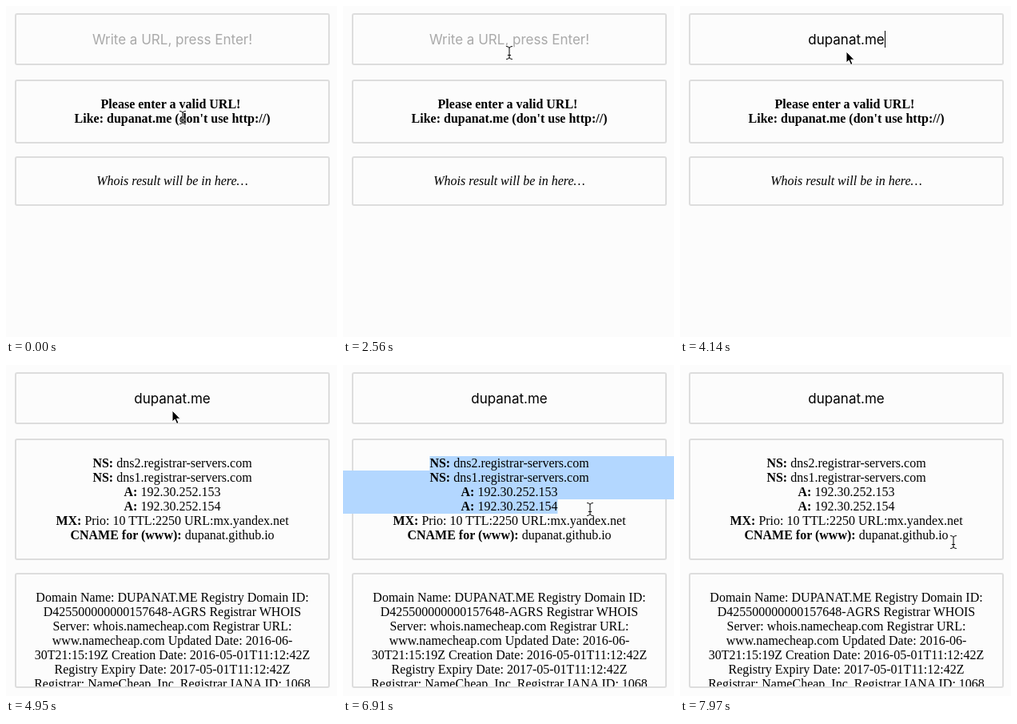
Recreate the animation shown at these times as an HTML page. Size 414 by 414 pixels, loop 8 s.

```html
<!DOCTYPE html>
<html lang="en">
<head>
<meta charset="utf-8">
<title>Whois lookup</title>
<style>
  html, body { margin: 0; width: 100%; height: 100%; overflow: hidden; background: #fcfcfc; }
  svg { display: block; width: 414px; height: 414px; }
  text { font: 16px "Liberation Serif", serif; text-anchor: middle; white-space: pre; }
  .bold { font-weight: bold; }
  .italic { font-style: italic; }
  #input { font: 17px Inter, sans-serif; }
  .box { fill: none; stroke: #ddd; stroke-width: 2; }
</style>
</head>
<body>
<svg viewBox="0 0 414 414">
  <clipPath id="whoisClip"><rect x="13" y="262" width="390" height="140"/></clipPath>
  <rect class="box" x="12" y="10" width="392" height="63" rx="2"/>
  <rect class="box" id="dnsBox" x="12" y="93" width="392" rx="2"/>
  <rect class="box" id="whoisBox" x="12" width="392" rx="2"/>
  <path id="selection" fill="#b3d7ff"/>
  <text id="input" x="208" y="48"></text>
  <rect id="caret" y="31" width="1" height="21"/>
  <g id="before">
    <text class="bold" x="206" y="128">Please enter a valid URL!</text>
    <text class="bold" id="hint" x="208" y="146">Like: dupanat.me (don't use http://)</text>
    <text class="italic" x="208" y="224">Whois result will be in here…</text>
  </g>
  <g id="after">
    <g id="dns"></g>
    <g id="whois" clip-path="url(#whoisClip)"></g>
  </g>
  <g id="beam" fill="none" stroke-linecap="round">
    <path id="beamShape" stroke="#fff" stroke-width="2.4" opacity=".8"
      d="M-3.5 -7.5Q-.5 -7.5 0 -5.5Q.5 -7.5 3.5 -7.5M0 -5.5V6.5M-3.5 8.5Q-.5 8.5 0 6.5Q.5 8.5 3.5 8.5M-1.7 3.5H1.7"/>
    <use href="#beamShape"/>
  </g>
  <path id="arrow" stroke="#fff" d="M0 0V14L3.2 11L5.6 16.5L8 15.5L5.6 10.2H10Z"/>
</svg>
<script>
const LOOP = 8000, LINE = 18, TOP = 114, WIDTH = 414;
const DOMAIN = 'dupanat.me';
const RESULT_AT = 4950;
const $ = id => document.getElementById(id);

const dnsRows = [
  ['NS:', 'dns2.registrar-servers.com'],
  ['NS:', 'dns1.registrar-servers.com'],
  ['A:', '192.30.252.153'],
  ['A:', '192.30.252.154'],
  ['MX:', 'Prio: 10 TTL:2250 URL:mx.yandex.net'],
  ['CNAME for (www):', 'dupanat.github.io'],
];
const whoisRows = [
  'Domain Name: DUPANAT.ME Registry Domain ID:',
  'D425500000000157648-AGRS Registrar WHOIS',
  'Server: whois.namecheap.com Registrar URL:',
  'www.namecheap.com Updated Date: 2016-06-',
  '30T21:15:19Z Creation Date: 2016-05-01T11:12:42Z',
  'Registry Expiry Date: 2017-05-01T11:12:42Z',
  'Registrar: NameCheap, Inc. Registrar IANA ID: 1068',
];
const textRow = (y, html) => `<text x="208" y="${y}">${html}</text>`;
$('dns').innerHTML = dnsRows.map(([key, value], i) =>
  textRow(128 + i * LINE, `<tspan class="bold">${key}</tspan> ${value}`)).join('');
$('whois').innerHTML = whoisRows.map((row, i) => textRow(296 + i * LINE, row)).join('');
const dnsTexts = [...$('dns').children];

// Pointer moves: first change, last change, number of steps, way points.
const moves = [
  [180, 270, 2, [[221, 139], [217, 139]]],
  [450, 1230, 10, [[217, 139], [325, 140]]],
  [1500, 2020, 7, [[325, 140], [208, 58]]],
  [5670, 6290, 8, [[208, 58], [221, 105], [175, 150], [108, 111]]],
  [6470, 7260, 10, [[108, 111], [169, 118], [239, 148], [309, 180], [332, 200], [338, 214]]],
  [7340, 7340, 1, [[338, 214], [342, 221]]],
];

const typingTimes = [
  ...Array.from({ length: 7 }, (_, i) => 2730 + i * 530 / 6),
  3530, 3790, 3880,
];

function along(points, p) {
  const u = p * (points.length - 1);
  const i = Math.min(Math.floor(u), points.length - 2);
  return points[i].map((v, axis) => v + (points[i + 1][axis] - v) * (u - i));
}

function pointerAt(t) {
  let at = moves[0][3][0];
  for (const [start, end, steps, points] of moves) {
    if (t < start) break;
    const gap = (end - start) / (steps - 1) || 1;
    const done = Math.min(steps, Math.floor((t - start) / gap + 0.01) + 1);
    at = along(points, done / steps);
  }
  return at;
}

// Nearest character edge to x, not left of the given character.
function snap(text, x, from = 0) {
  let best = text.getStartPositionOfChar(from).x;
  for (let i = from; i < text.getNumberOfChars(); i++) {
    const edge = text.getEndPositionOfChar(i).x;
    if (Math.abs(edge - x) < Math.abs(best - x)) best = edge;
  }
  return best;
}

const band = (x1, x2, y, h = LINE) => `M${x1} ${y}H${x2}V${y + h}H${x1}Z`;

function selectionAt(t, [x, y]) {
  if (t >= 450 && t < 1500) {
    const hint = $('hint'), from = hint.textContent.indexOf("don't");
    return band(hint.getStartPositionOfChar(from).x, snap(hint, x, from), TOP + LINE);
  }
  if (t >= 6600 && t < 7970) {
    const row = Math.max(0, Math.min(5, Math.floor((y - TOP) / LINE)));
    const start = dnsTexts[0].getStartPositionOfChar(0).x;
    const end = snap(dnsTexts[row], x);
    if (!row) return band(start, end, TOP);
    return band(start, WIDTH, TOP)
      + band(0, WIDTH, TOP + LINE, (row - 1) * LINE)
      + band(0, end, TOP + row * LINE);
  }
  return '';
}

const show = (id, on) => $(id).setAttribute('visibility', on ? 'visible' : 'hidden');

function place(id, x, y) {
  $(id).setAttribute('transform', `translate(${Math.round(x)} ${Math.round(y)})`);
}

function setBox(id, y, height) {
  $(id).setAttribute('y', y);
  $(id).setAttribute('height', height);
}

function drawInput(t) {
  const count = typingTimes.filter(time => t >= time).length;
  const input = $('input');
  input.textContent = count ? DOMAIN.slice(0, count) : 'Write a URL, press Enter!';
  input.setAttribute('fill', count ? '#000' : '#a9a9a9');
  const half = count ? input.getComputedTextLength() / 2 : 0;
  $('caret').setAttribute('x', Math.round(208 + half));
  show('caret', (t >= 2020 && t < 2560) || (count && t < RESULT_AT));
}

function draw(t) {
  const done = t >= RESULT_AT;
  show('before', !done);
  show('after', done);
  setBox('dnsBox', 93, done ? 150 : 78);
  setBox('whoisBox', done ? 261 : 189, done ? 142 : 60);
  drawInput(t);

  const pointer = pointerAt(t);
  const isArrow = t >= 4140 && t < 5840;
  place('beam', ...pointer);
  place('arrow', pointer[0], pointer[1] - 1);
  show('beam', !isArrow);
  show('arrow', isArrow);
  $('selection').setAttribute('d', selectionAt(t, pointer));
}

// Dark core of the I-beam over its light halo.
const core = $('beamShape').cloneNode();
core.removeAttribute('id');
core.setAttribute('stroke', '#000');
core.setAttribute('stroke-width', 1);
core.setAttribute('opacity', 1);
$('beam').replaceChild(core, $('beam').querySelector('use'));

const began = performance.now();
function tick() {
  draw((performance.now() - began) % LOOP);
  requestAnimationFrame(tick);
}
tick();
</script>
</body>
</html>
```
